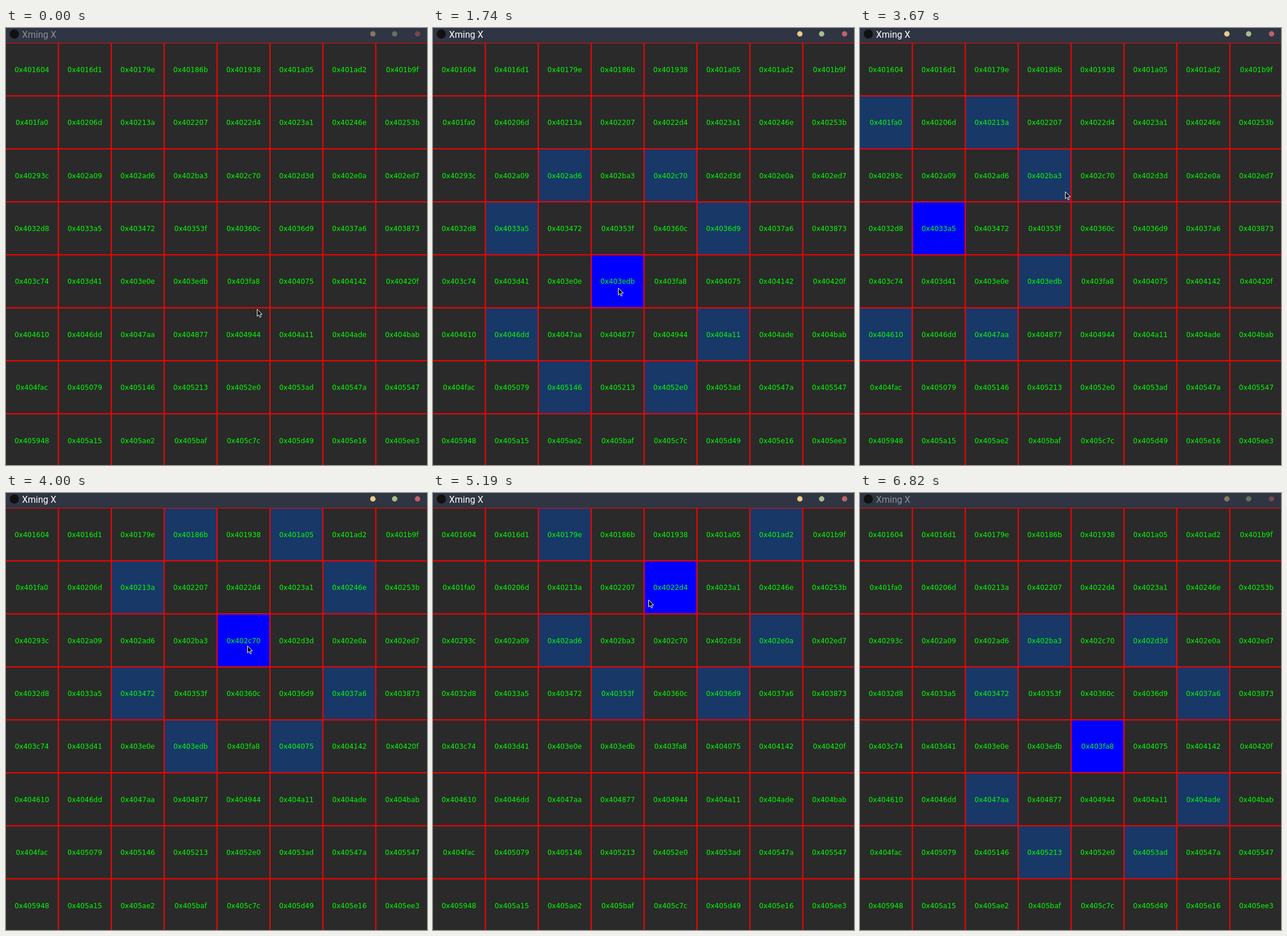
An HTML page with a canvas for the animation above (6.92 s loop, 735 by 762 pixels).

```html
<!DOCTYPE html>
<html lang="en">
<head>
<meta charset="utf-8">
<title>Knight moves</title>
<style>
  html, body { margin: 0; width: 100%; height: 100%; overflow: hidden; background: #2a2a2a; }
  canvas { display: block; }
</style>
</head>
<body>
<canvas id="stage" width="735" height="762"></canvas>
<script>
const ctx = document.getElementById('stage').getContext('2d');
const W = 735, H = 762, LOOP = 6920;
const SIZE = 8, CELL = 739 / SIZE, LEFT = -1, TOP = 26;
const FOCUS_ON = 690, FOCUS_OFF = 6820, POINTER_OUT = 6230, TICK = 60;

// The pointer travels to a spot, then clicks the cell under it
const hops = [
  { from: 60, to: 630, click: 750, x: 331, y: 457 },
  { from: 1740, to: 2580, click: 2790, x: 127, y: 354 },
  { from: 3230, to: 3820, click: 4000, x: 421, y: 266 },
  { from: 4150, to: 4450, click: 4630, x: 709, y: 60 },
  { from: 4810, to: 5040, click: 5190, x: 376, y: 186 },
  { from: 5340, to: 5520, click: 5640, x: 330, y: 240 },
  { from: 5700, to: 5990, click: 6080, x: 378, y: 471 },
  { from: 6130, to: 6180, click: Infinity, x: 368, y: 701 }
];

const lineX = c => LEFT + CELL * c;
const lineY = r => TOP + CELL * r;
const ease = p => (p + p * p * (3 - 2 * p)) / 2;

function pointerAt(t) {
  let x = 438, y = 490;
  for (const hop of hops) {
    if (t < hop.from) break;
    const moved = (Math.floor((t - hop.from) / TICK) + 1) * TICK;
    const p = ease(Math.min(1, moved / (hop.to - hop.from + TICK)));
    x += (hop.x - x) * p;
    y += (hop.y - y) * p;
  }
  return [Math.round(x), Math.round(y)];
}

function eachCell(visit) {
  for (let r = 0; r < SIZE; r++)
    for (let c = 0; c < SIZE; c++) visit(r, c);
}

function fillCell(r, c, color) {
  ctx.fillStyle = color;
  ctx.fillRect(lineX(c), lineY(r), CELL, CELL);
}

function drawMoves(t) {
  const spot = hops.filter(hop => hop.click <= t).pop();
  if (!spot) return;
  const col = Math.floor((spot.x - LEFT) / CELL);
  const row = Math.floor((spot.y - TOP) / CELL);
  fillCell(row, col, '#0000ff');
  eachCell((r, c) => {
    if (Math.abs(r - row) * Math.abs(c - col) === 2) fillCell(r, c, '#183868');
  });
}

function drawBoard(t) {
  ctx.fillStyle = '#2a2a2a';
  ctx.fillRect(0, 0, W, H);
  drawMoves(t);

  ctx.fillStyle = '#ff0000';
  for (let i = 0; i < SIZE; i++) {
    ctx.fillRect(0, lineY(i) - 1, W, 2);
    ctx.fillRect(lineX(i) - 1, TOP, 2, H);
  }

  ctx.font = '12px "DejaVu Sans", sans-serif';
  ctx.textAlign = 'center';
  ctx.fillStyle = '#00ff00';
  eachCell((r, c) => {
    const address = 0x401604 + 205 * (12 * r + c);
    ctx.fillText('0x' + address.toString(16),
      lineX(c + 0.5), Math.round(lineY(r + 0.5) + 4.8));
  });
}

function disc(x, y, radius, color) {
  ctx.fillStyle = color;
  ctx.beginPath();
  ctx.arc(x, y, radius, 0, 2 * Math.PI);
  ctx.fill();
}

function drawTitle(focused) {
  ctx.fillStyle = '#2f3542';
  ctx.fillRect(0, 0, W, TOP);
  disc(14.5, 10.5, 8, '#111111');
  ctx.font = '16px Roboto, "Noto Sans", sans-serif';
  ctx.textAlign = 'left';
  ctx.fillStyle = focused ? '#ffffff' : '#8b8f97';
  ctx.fillText('Xming X', 28, 17);
  const dots = focused
    ? ['#ebcb8b', '#a3be8c', '#bf616a']
    : ['#857761', '#647061', '#744650'];
  [640.5, 678.5, 718.5].forEach((x, i) => disc(x, 10.2, 4.7, dots[i]));
}

function drawPointer(x, y) {
  const arrow = [[0, 0], [0, 12.2], [2.8, 9.7], [4.9, 14], [6.8, 13.2], [4.9, 8.9], [8.7, 8.7]];
  ctx.beginPath();
  for (const [dx, dy] of arrow) ctx.lineTo(x + dx + 0.5, y + dy + 0.5);
  ctx.closePath();
  ctx.fillStyle = '#000000';
  ctx.fill();
  ctx.strokeStyle = '#ffffff';
  ctx.lineWidth = 1;
  ctx.lineJoin = 'round';
  ctx.stroke();
}

function draw(t) {
  drawBoard(t);
  drawTitle(t >= FOCUS_ON && t < FOCUS_OFF);
  if (t < POINTER_OUT) drawPointer(...pointerAt(t));
}

let origin;
function tick(now) {
  if (origin === undefined) origin = now;
  draw((now - origin) % LOOP);
  requestAnimationFrame(tick);
}
draw(0);
requestAnimationFrame(tick);
</script>
</body>
</html>
```
